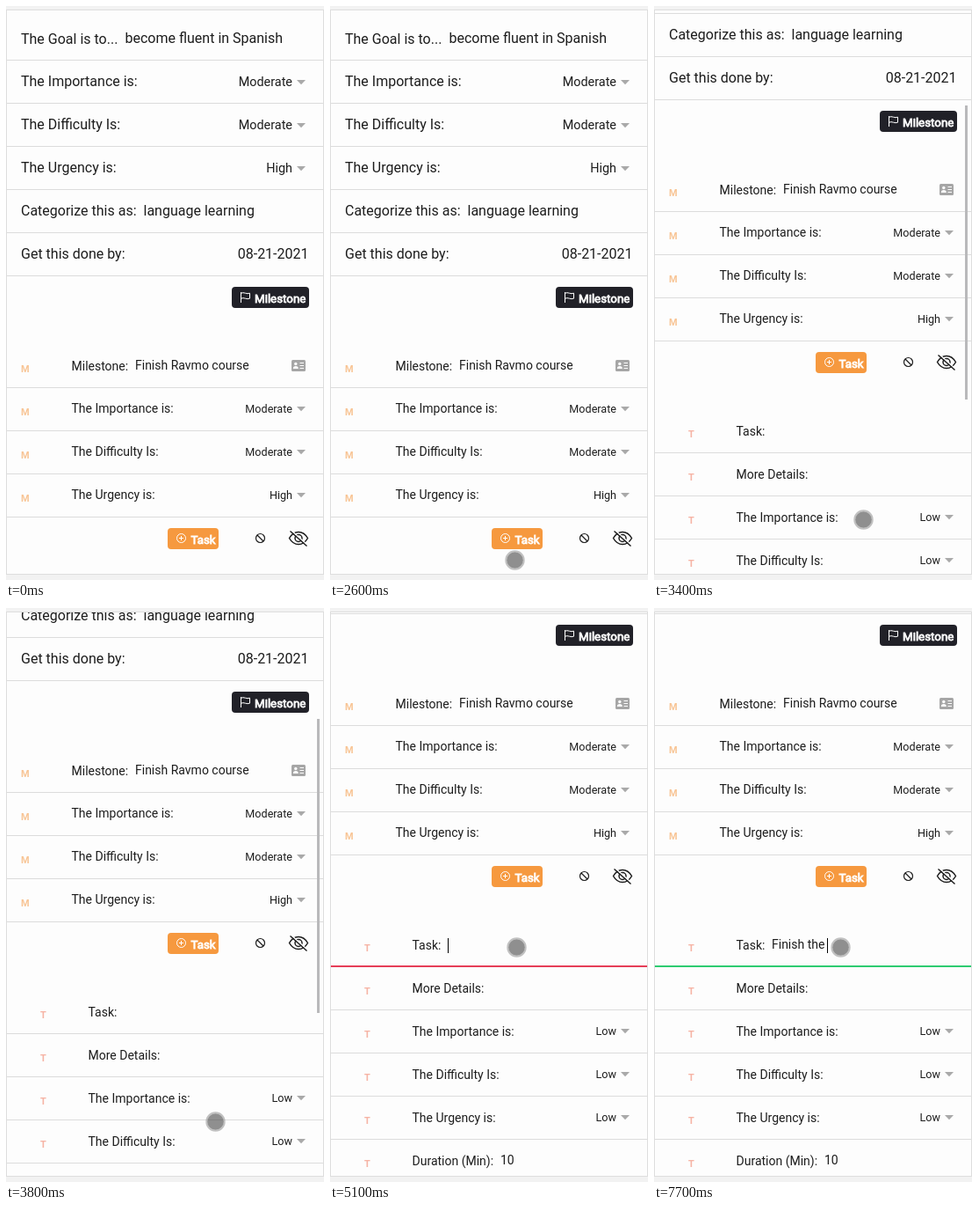
Recreate the animation shown at these times as an HTML page. Size 362 px wide and 652 px high, loop 8 s.

```html
<!DOCTYPE html>
<html lang="en">
<head>
<meta charset="utf-8">
<title>Goal form</title>
<style>
html, body { margin: 0; width: 362px; height: 652px; overflow: hidden; background: #f2f2f2; }
svg { display: block; font-family: Roboto, Arial, sans-serif; }
text { white-space: pre; fill: #1d1d1d; }
</style>
</head>
<body>
<svg id="stage" width="362" height="652" viewBox="0 0 362 652">
  <clipPath id="view"><rect x="1" y="5" width="360" height="640"/></clipPath>
  <rect x=".5" y="4.5" width="361" height="641" fill="#fdfdfd" stroke="#dedede"/>
  <g clip-path="url(#view)">
    <g id="list"></g>
    <rect id="bar" x="354" width="3" height="334" fill="#b9b9bb"/>
  </g>
  <g id="cursor">
    <circle r="10.2" fill="none" stroke="#999" stroke-opacity=".6" stroke-width="2"/>
    <circle id="dot" r="9.3" fill="#464646"/>
  </g>
</svg>
<script>
const LOOP = 8000, STEP = 100;
const $ = id => document.getElementById(id);
const list = $('list');

function add(tag, attrs, content) {
  const el = document.createElementNS('http://www.w3.org/2000/svg', tag);
  for (const k in attrs) el.setAttribute(k, attrs[k]);
  if (content !== undefined) el.textContent = content;
  list.appendChild(el);
  return el;
}
const text = (s, x, y, size, more) => add('text', { x, y, 'font-size': size, ...more }, s);
const path = (d, stroke, width, more) =>
  add('path', { d, fill: 'none', stroke, 'stroke-width': width, ...more });
const line = y => add('rect', { x: 1, y, width: 360, height: 1, fill: '#dcdcdc' });

function select(value, y, size) {
  text(value, 326, y, size, { 'text-anchor': 'end' });
  add('path', { d: `M331 ${y - 7}h10l-5 5.2z`, fill: '#a9a9a9' });
}
const tag = (s, x, y, fill) =>
  text(s, x, y, 11, { 'font-weight': 700, style: 'fill:' + fill });

function button(label, x, y, w, tx, fill) {
  add('rect', { x, y, width: w, height: 24, rx: 4, fill });
  text(label, tx, y + 18, 13.33, { style: 'fill:#fff;stroke:#fff;stroke-width:.8px' });
}

// Goal rows
['The Goal is to...', 'The Importance is:', 'The Difficulty Is:', 'The Urgency is:',
  'Categorize this as:', 'Get this done by:'].forEach((s, i) => {
  text(s, 17, 43 + 49 * i - (i > 0), 16);
  line(61 + 49 * i);
});
text('become fluent in Spanish', 135.5, 42, 16);
text('language learning', 156.5, 238, 16);
text('08-21-2021', 344.5, 287, 16, { 'text-anchor': 'end' });
['Moderate', 'Moderate', 'High'].forEach((s, i) => select(s, 91 + 49 * i, 14.4));

button('Milestone', 257, 319, 88, 283, '#212128');
path('M267.5 325v12M267.5 326.2q2.5-1 5 0t5 0v6q-2.5 1-5 0t-5 0', '#fff', 1);

// Milestone rows
['Milestone:', 'The Importance is:', 'The Difficulty Is:', 'The Urgency is:'].forEach((s, i) => {
  tag('M', 17, 416 + 49 * i, '#f8c596');
  text(s, 74.5, 414 + 49 * i - (i > 0), 14);
  line(433 + 49 * i);
});
text('Finish Ravmo course', 147, 413, 14);
['Moderate', 'Moderate', 'High'].forEach((s, i) => select(s, 462 + 49 * i, 12.6));

add('rect', { x: 325, y: 402, width: 16, height: 13, rx: 1.5, fill: '#a6a6a6' });
add('circle', { cx: 329.8, cy: 406.5, r: 1.7, fill: '#fdfdfd' });
add('path', { d: 'M326.8 412q0-3 3-3t3 3z', fill: '#fdfdfd' });
path('M334.5 405.5h4.5M334.5 408.5h4.5M334.5 411.5h4.5', '#fdfdfd', 1);

button('Task', 184, 593, 58, 210.5, '#f6993f');
add('circle', { cx: 199.5, cy: 604.5, r: 5, fill: 'none', stroke: '#fff' });
path('M197 604.5h5M199.5 602v5', '#fff', 1);

add('circle', { cx: 289.5, cy: 604.5, r: 5, fill: 'none', stroke: '#1d1d1d', 'stroke-width': 1.2 });
path('M286 601l7 7', '#1d1d1d', 1.2);
path('M322.5 604.5q4-7 10.5-7t10.5 7q-4 7-10.5 7t-10.5-7z', '#1d1d1d', 1.5);
add('circle', { cx: 333, cy: 604.5, r: 4, fill: 'none', stroke: '#1d1d1d', 'stroke-width': 1.5 });
path('M324.5 595.5l19 17', '#fdfdfd', 1.5);
path('M323.5 596.5l19 17', '#1d1d1d', 1.5);

// Task rows
['Task:', 'More Details:', 'The Importance is:', 'The Difficulty Is:', 'The Urgency is:',
  'Duration (Min):'].forEach((s, i) => {
  tag('T', 39, 790 - 100 + 49 * i, '#f6b3a4');
  text(s, 93.5, 688 + 49 * i, 14);
  line(707 + 49 * i);
});
for (let i = 0; i < 3; i++) select('Low', 785 + 49 * i, 12.6);
text('10', 194, 932, 14);

const typed = text('', 134, 687, 14);
const rule = add('rect', { x: 1, y: 706, width: 360, height: 2 });
const caret = add('rect', { y: 675, width: 1, height: 17, fill: '#000' });

// Tracks: [time, ...values], linear between entries
const POS = [
  [100, 40.5, 8], [200, 95, 95], [300, 148, 182], [400, 170.5, 216.5],
  [500, 170.5, 216.5], [600, 170.5, 221], [700, 170.5, 223.5],
  [1200, 170.5, 223.5], [1300, 192, 238], [1400, 262, 285], [1500, 327, 329], [1600, 350.5, 344.5],
  [1800, 350.5, 344.5], [1900, 340, 362], [2000, 308, 415], [2200, 230, 540], [2400, 192.5, 610],
  [2500, 200, 624], [2600, 210.5, 629.5],
  [2700, 210.5, 629.5], [2800, 217, 618], [2900, 232, 594], [3000, 238.5, 583.5],
  [4100, 238.5, 583.5], [4200, 233, 547], [4300, 219, 457], [4400, 212.5, 413.5],
  [4500, 212.5, 413.5], [4600, 212.5, 395], [4700, 212.5, 385.5]
];
const SCROLL = [[3100, 0], [3200, 24], [3300, 130], [3400, 200],
  [3700, 200], [3800, 224], [3900, 280], [4000, 300]];
const BAR = [[3100, 0], [3200, 1], [4100, 1], [4400, 0]];
const PHRASE = 'Finish the ';
const KEYS = [6200, 6300, 6500, 6600, 6800, 7000, 7200, 7400, 7500, 7500, 7700];

function at(track, t) {
  if (t <= track[0][0]) return track[0].slice(1);
  const i = track.findIndex(k => k[0] > t);
  if (i < 0) return track[track.length - 1].slice(1);
  const a = track[i - 1], b = track[i], f = (t - a[0]) / (b[0] - a[0]);
  return a.slice(1).map((v, j) => v + (b[j + 1] - v) * f);
}

function mix(a, b, f) {
  return `rgb(${a.map((v, i) => Math.round(v + (b[i] - v) * f))})`;
}

function draw(t) {
  const [x, y] = at(POS, t), [s] = at(SCROLL, t);
  $('cursor').setAttribute('transform', `translate(${x} ${y})`);
  $('cursor').setAttribute('visibility', t < 100 ? 'hidden' : 'visible');
  $('dot').setAttribute('fill-opacity', t === 3200 ? .75 : .6);
  list.setAttribute('transform', `translate(0 ${-s})`);
  $('bar').setAttribute('y', Math.round(7 + s * .53));
  $('bar').setAttribute('opacity', at(BAR, t)[0]);

  const n = KEYS.filter(k => k <= t).length;
  typed.textContent = PHRASE.slice(0, n);
  const w = n ? typed.getComputedTextLength() : 0;
  caret.setAttribute('x', Math.floor(134 + w));
  const on = t >= 5100 && !(t >= 5600 && t < 6100);
  caret.setAttribute('visibility', on ? 'visible' : 'hidden');
  rule.setAttribute('visibility', t >= 5100 ? 'visible' : 'hidden');
  const f = Math.min(1, Math.max(0, (t - 6100) / 300));
  rule.setAttribute('fill', mix([230, 62, 88], [46, 204, 113], f));
}

function tick() {
  draw(Math.floor(performance.now() % LOOP / STEP) * STEP);
  requestAnimationFrame(tick);
}
tick();
</script>
</body>
</html>
```
